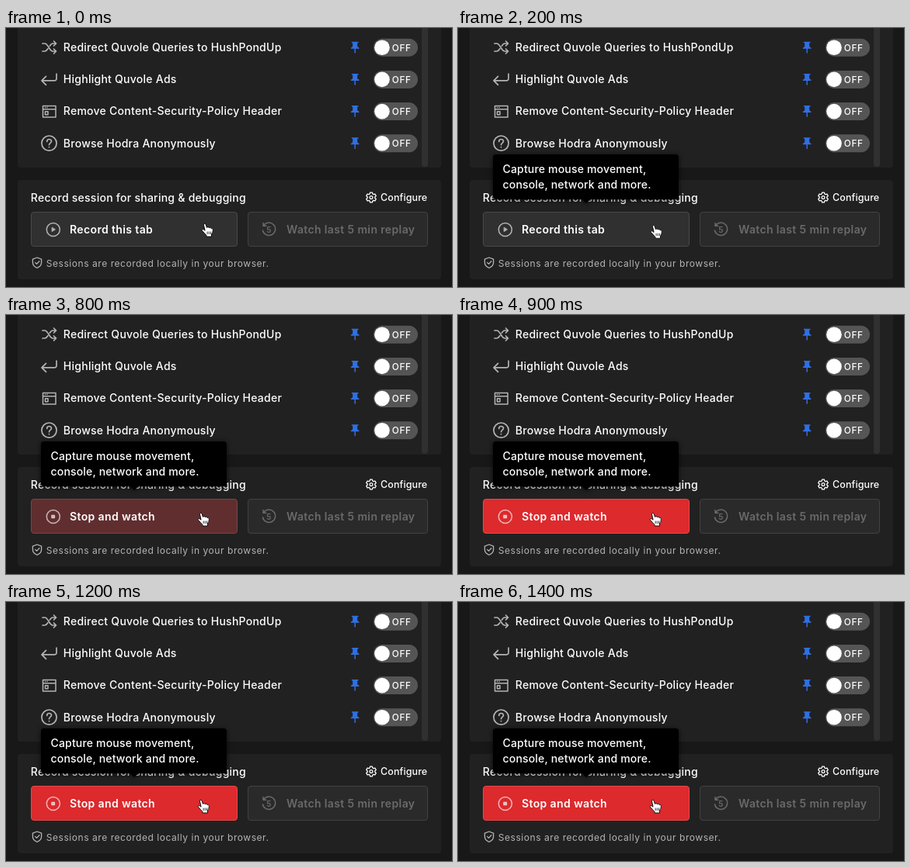
Animation of 574x334 px, one loop 1.5 s. Source, as an HTML page:

```html
<!DOCTYPE html>
<html lang="en">
<head>
<meta charset="utf-8">
<title>Session recorder</title>
<style>
html, body { margin: 0; width: 100%; height: 100%; overflow: hidden; background: #181818; }
svg { display: block; font: 500 14px Inter, sans-serif; letter-spacing: .26px; fill: #fff; }
.line { fill: none; stroke: #b4b4b4; stroke-width: 1.7; stroke-linecap: round; stroke-linejoin: round; }
.bold { font-weight: 600; letter-spacing: .37px; }
.panel { fill: #212121; }
#tip { letter-spacing: .18px; filter: drop-shadow(0 1px 3px rgba(0, 0, 0, .7)); }
</style>
</head>
<body>
<svg width="574" height="334" viewBox="0 0 574 334">
  <rect class="panel" x="15" y="-10" width="545" height="190" rx="4"/>
  <rect x="535" y="-6" width="8" height="185" rx="4" fill="#303030"/>
  <g id="rows"></g>

  <rect class="panel" x="15" y="196" width="545" height="128" rx="4"/>
  <text x="31.8" y="223.8">Record session for sharing &amp; debugging</text>
  <g class="line" style="stroke:#fff;stroke-width:1.3" transform="translate(470 218.5)">
    <polygon id="gear"/>
    <circle r="1.9"/>
  </g>
  <text x="482" y="223.3" font-size="12.5" letter-spacing=".1">Configure</text>

  <rect id="button" x="32.5" y="237.5" width="265" height="44" rx="3.5"/>
  <g id="icon" class="line">
    <circle cx="60.8" cy="260" r="8.5" stroke-width="1.500"/>
    <path id="play" d="M59.200 257.500v5l3.900-2.500z" stroke-width="1"/>
    <rect id="stop" x="59" y="258.200" width="3.600" height="3.600" stroke-width="1"/>
  </g>
  <text id="label" class="bold" x="82" y="265"></text>

  <rect x="311.5" y="237.5" width="231" height="44" rx="3.5" fill="#2a2a2a" stroke="#424242"/>
  <g fill="#6a6a6a">
    <path class="line" style="stroke:#6a6a6a;stroke-width:1.5" d="M331.5 254.8a8.2 8.2 0 1 1-1.1 6.2M331 251.5v3.8h3.8"/>
    <text class="bold" x="338.5" y="263.7" font-size="10" text-anchor="middle">5</text>
    <text class="bold" x="361" y="265">Watch last 5 min replay</text>
  </g>

  <path class="line" style="stroke-width:1.3" d="M40 296l5.600 2.100v4.400c0 3.400-2.500 5.600-5.600 7-3.100-1.400-5.600-3.600-5.600-7v-4.400zM37.500 302.400l2 2 3.400-3.600"/>
  <text x="51.800" y="307.500" font-size="12" font-weight="400" letter-spacing=".55" fill="#b4b4b4" style="letter-spacing:.55px">Sessions are recorded locally in your browser.</text>

  <g id="tip">
    <path d="M49 163H280q4 0 4 4v50q0 4-4 4H170l-5 5-5-5H49q-4 0-4-4V167q0-4 4-4z" fill="#000"/>
    <text x="57.500" y="187">Capture mouse movement,</text>
    <text x="57.500" y="207">console, network and more.</text>
  </g>

  <g id="hand" stroke="#000" stroke-width=".9" stroke-linejoin="round">
    <path d="M3 2C2.500 .3 5-.3 5.600 1.400L7 5.500C7.500 4.300 9.400 4.400 9.800 5.700C10.600 4.900 12.200 5.200 12.500 6.500C13.600 6 14.800 6.800 14.800 8.200C14.800 11 14 12.500 13 14V17H6.500V15.500C4.500 13.700 3 11 .9 9.400C-.1 8.400 1.400 7 2.900 8L4.600 9.200Z"/>
    <path d="M7.600 10.500v3.500M9.800 10.500v3.500M12 10.500v3.500" stroke-width=".8"/>
  </g>
</svg>
<script>
const $ = id => document.getElementById(id);

const rows = [
  ["Redirect Quvole Queries to HushPondUp",
    '<path d="M47-5h3c4 0 6 10 10 10h4M47 5h3c1.600 0 2.800-1.500 3.800-3.200M56.400-1.800C57.400-3.600 58.600-5 60-5h4M61.500-8l3 3-3 3M61.500 2l3 3-3 3"/>'],
  ["Highlight Quvole Ads",
    '<path d="M65-7v5.700q0 3-3 3H46.500M51.500-3.800l-5.500 5.500 5.500 5.500"/>'],
  ["Remove Content-Security-Policy Header",
    '<path d="M47.500-7h16.500v14.500h-16.500zM47.500-2.700h16.500M50.500-4.900h.1M53-4.900h.1M50.500 .3h3.500v4h-3.500z" stroke-width="1.500"/>'],
  ["Browse Hodra Anonymously",
    '<circle cx="55.500" r="9.600"/><path d="M52.700-2.200c0-4 5.800-3.700 5.800-.3 0 2.300-3 2.200-3 4.600M55.500 5v.1"/>']
];

$("rows").innerHTML = rows.map(([name, icon], i) => `
  <g transform="translate(0 ${25 + i * 41.2})">
    <g class="line">${icon}</g>
    <text x="73.800" y="5">${name}</text>
    <path transform="translate(440.200 -8.800) scale(.75)" fill="#2f6fe4"
      d="M16 9V4h1q1 0 1-1t-1-1H7q-1 0-1 1t1 1h1v5q0 3-3 3v2h6v7l1 1 1-1v-7h6v-2q-3 0-3-3z"/>
    <rect x="473" y="-11.300" width="57" height="23" rx="11.500" fill="#555"/>
    <circle cx="484" cy=".2" r="9.800"/>
    <text x="496.800" y="4.600" font-size="11.800" style="letter-spacing:.6px">OFF</text>
  </g>`).join("");

// Six teeth, four corners each
$("gear").setAttribute("points", Array.from({ length: 24 }, (_, i) => {
  const angle = ((i >> 2) * 60 + [-22, -12, 12, 22][i % 4] - 90) * Math.PI / 180;
  const r = i % 4 % 3 ? 6.6 : 4.9;
  return [r * Math.cos(angle), r * Math.sin(angle)];
}).join(" "));

const path = [[251.5, 252], [248.5, 253.3], [247.5, 254.2], [246.5, 255]];
const show = (id, on) => $(id).setAttribute("visibility", on ? "visible" : "hidden");

function draw(now) {
  const step = Math.floor(now % 1500 / 100);
  const recording = step >= 8;
  const [fill, edge] = step < 8 ? ["#303030", "#494949"]
    : step < 9 ? ["#612e30", "#754648"] : ["#dc2a2d", "#e14a4c"];
  const ink = recording ? "rgba(255,255,255,.65)" : "#b4b4b4";

  $("button").setAttribute("fill", fill);
  $("button").setAttribute("stroke", edge);
  $("icon").style.stroke = ink;
  $("play").style.fill = $("stop").style.fill = ink;
  $("label").textContent = recording ? "Stop and watch" : "Record this tab";
  show("play", !recording);
  show("stop", recording);
  show("tip", step >= 1);
  $("hand").setAttribute("transform", `translate(${path[Math.min(step, 3)]})`);
  requestAnimationFrame(draw);
}
draw(performance.now());
</script>
</body>
</html>
```
